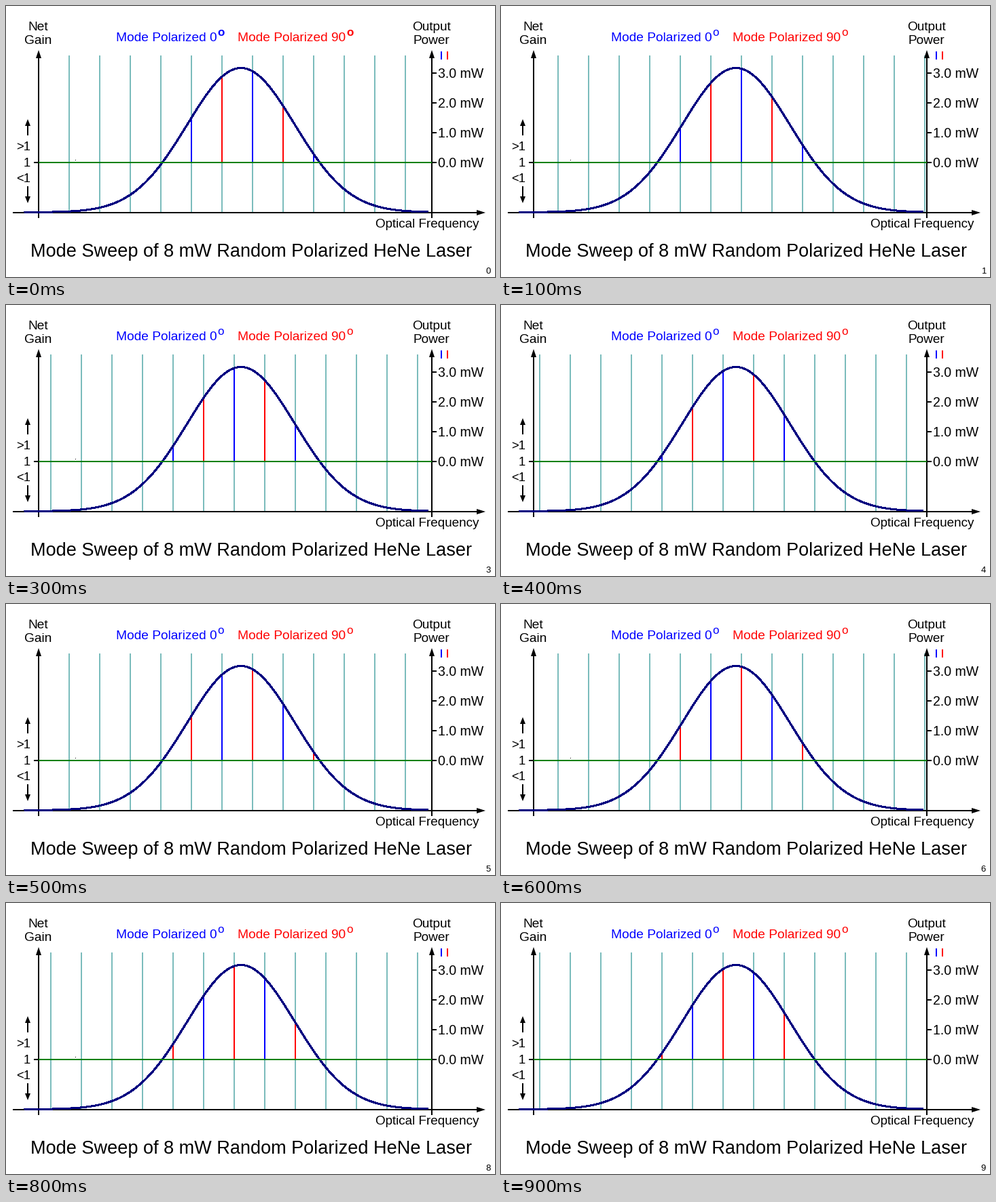
A matplotlib script for the animation above (1 s loop, 720x400 px).

```python
import numpy as np
import matplotlib.pyplot as plt
from matplotlib.animation import FuncAnimation
from matplotlib.collections import LineCollection

WIDTH, HEIGHT, DPI = 720, 400, 80
PX = 72 / DPI
FRAMES, STEP, SPACING = 10, 9, 45
LEFT, RIGHT, TOP, UNITY, BASE = 48, 627, 73, 231, 304.5
TEAL, NAVY, GREEN = "#7bbcbc", "#000080", "#008000"
MODE_COLORS = ("#0000ff", "#ff0000")

plt.rcParams["font.family"] = "Liberation Sans"
fig = plt.figure(figsize=(WIDTH / DPI, HEIGHT / DPI), dpi=DPI, facecolor="white")
ax = fig.add_axes([0, 0, 1, 1])
ax.set(xlim=(0, WIDTH), ylim=(HEIGHT, 0))
ax.axis("off")


def gain(x):
    return BASE - 213 * np.exp(-((x - 346) / 79.4) ** 2 / 2)


def line(x0, y0, x1, y1, color="black", z=3):
    ax.plot([x0, x1], [y0, y1], color=color, lw=2 * PX, zorder=z,
            antialiased=False, solid_capstyle="butt")


def arrow_head(x, y, dx, dy, length=12, half=4):
    bx, by = x - dx * length, y - dy * length
    ax.fill([x, bx + dy * half, bx - dy * half],
            [y, by + dx * half, by - dx * half], color="black", lw=0, zorder=4)


def label(x, y, text, size=19.2, color="black", **kw):
    return ax.text(x, y, text, size=size * PX, color=color,
                   va="baseline", zorder=5, **kw)


# Axes, threshold and gain curve
line(10, 305, 696, 305)
arrow_head(706, 305, 1, 0, 13)
for x in (LEFT, RIGHT):
    line(x, 74, x, 313)
    arrow_head(x, 65, 0, -1)
line(LEFT, UNITY, RIGHT, UNITY, GREEN, z=3.5)
line(41, UNITY, LEFT, UNITY)
line(32, 175, 32, 191)
arrow_head(32, 167, 0, -1, 10)
line(32, 266, 32, 283)
arrow_head(32, 291, 0, 1, 10)
for i, y in enumerate((231, 187, 143, 99)):
    line(RIGHT, y, 634, y)
    label(636.5, y + 7, f"{i}.0 mW", 19.5)
for x, color in zip((641, 650), MODE_COLORS):
    line(x, 67, x, 79, color)
ax.fill([102, 103, 103, 102], [227, 227, 228, 228], color="black", lw=0)
curve_x = np.linspace(28, 620, 600)
ax.plot(curve_x, gain(curve_x), color=NAVY, lw=2 * PX, zorder=3.2, antialiased=False)

# Text
label(32, 36, "Net")
label(27.5, 56, "Gain")
label(598, 36, "Output", 19)
label(599.5, 56, "Power", 19)
label(15, 213, ">1", 18.5)
label(25.5, 237, "1", 18.5)
label(15, 260, "<1", 18.5)
label(544, 327, "Optical Frequency", 18.9)
label(36, 370.5, "Mode Sweep of 8 mW Random Polarized HeNe Laser", 27.1)
label(161.7, 52, "Mode Polarized 0", color=MODE_COLORS[0])
label(341, 52, "Mode Polarized 90", color=MODE_COLORS[1])
degrees = [label(x, 43.5, "o", 17, color)
           for x, color in zip((311, 501), MODE_COLORS)]
counter = label(706.8, 395, "", 13)

style = dict(linewidths=2 * PX, antialiaseds=False)
cavity = LineCollection([], colors=TEAL, zorder=1, **style)
lasing = LineCollection([], zorder=2, **style)
ax.add_collection(cavity, autolim=False)
ax.add_collection(lasing, autolim=False)


def draw(n):
    modes = [(273 - STEP * n + SPACING * m, MODE_COLORS[m % 2])
             for m in range(-6, 12)]
    modes = [(x, color) for x, color in modes if LEFT < x < RIGHT]
    active = [(x, color) for x, color in modes if gain(x) < UNITY]
    cavity.set_segments([[(x, TOP), (x, BASE)] for x, _ in modes])
    lasing.set_segments([[(x, gain(x)), (x, UNITY)] for x, _ in active])
    lasing.set_color([color for _, color in active])
    for degree in degrees:
        degree.set_fontweight("bold" if n == 0 else "normal")
    counter.set_text(str(n))
    return cavity, lasing, counter, *degrees


anim = FuncAnimation(fig, draw, frames=FRAMES, interval=100, repeat=True, blit=False)
plt.show()
```
